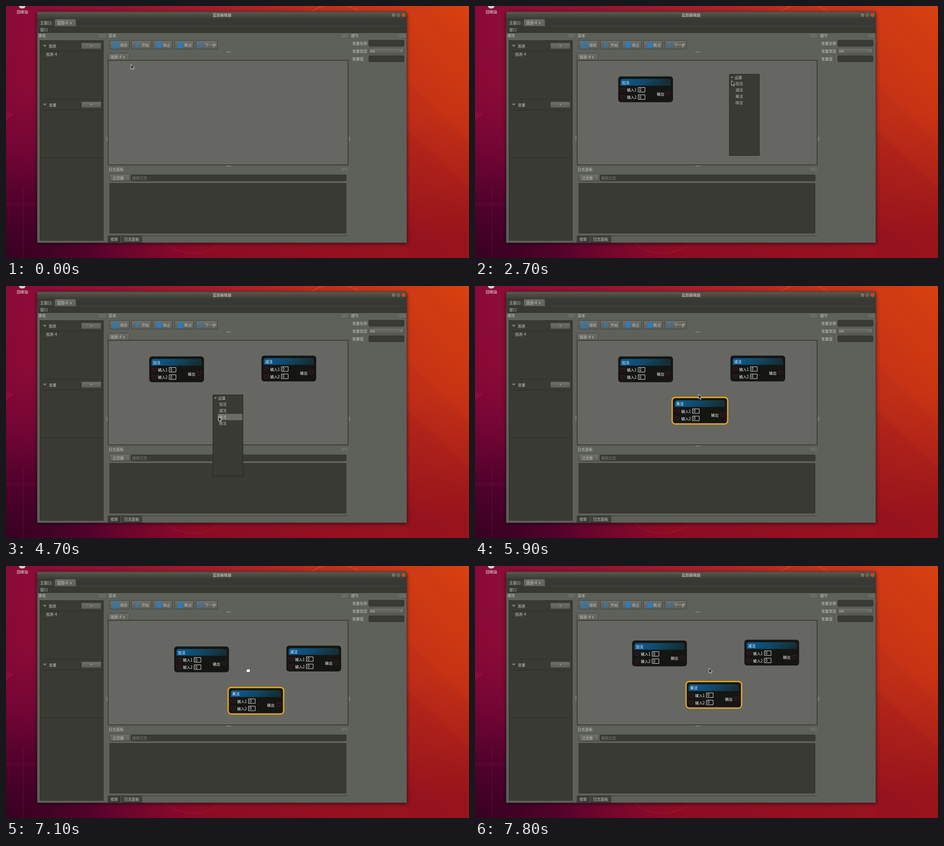
Recreate the animation shown at these times as an HTML page with a canvas. Size 1015 by 552 pixels, loop 8000 ms.

```html
<!DOCTYPE html>
<html lang="zh-CN">
<head>
<meta charset="utf-8">
<style>
html, body { margin: 0; width: 100%; height: 100%; overflow: hidden; background: #800038; }
canvas { display: block; }
</style>
</head>
<body>
<canvas id="stage" width="1015" height="552"></canvas>
<script>
const W = 1015, H = 552, LOOP = 8000, STEP = 100;
const FONT = '8.25px "Noto Sans CJK SC", "Noto Sans CJK", "Noto Sans", sans-serif';
const DARK = '#393a34', EDGE = '#2d2e29', INK = '#c5c6c1', BLUE = '#247fc8';
const screen = document.getElementById('stage').getContext('2d');
let g = screen;

function gradient(x0, y0, x1, y1, ...colors) {
  const fill = g.createLinearGradient(x0, y0, x1, y1);
  colors.forEach((c, i) => fill.addColorStop(i / (colors.length - 1), c));
  return fill;
}

function box(x, y, w, h, fill, stroke, r = 0, line = 1) {
  g.beginPath();
  g.roundRect(x, y, w, h, r);
  if (fill) { g.fillStyle = fill; g.fill(); }
  if (stroke) { g.strokeStyle = stroke; g.lineWidth = line; g.stroke(); }
}

// y is the vertical middle of the line
function text(s, x, y, color = INK, align = 'left') {
  g.font = FONT;
  g.textAlign = align;
  g.fillStyle = color;
  g.fillText(s, x, y + 3.1);
}

function path(d, x, y, fill, stroke, line = 1) {
  const p = new Path2D(d);
  g.save();
  g.translate(x, y);
  if (fill) { g.fillStyle = fill; g.fill(p); }
  if (stroke) { g.strokeStyle = stroke; g.lineWidth = line; g.stroke(p); }
  g.restore();
}

function ring(x, y, r, color, line) {
  g.beginPath();
  g.arc(x, y, r, 0, 7);
  g.strokeStyle = color;
  g.lineWidth = line;
  g.stroke();
}

function wallpaper() {
  box(0, 0, W, H, gradient(0, 0, W, 0, '#890a39', '#951431', '#aa2128', '#c6351a', '#de440d'));
  box(0, 0, W, H, gradient(500, 0, 560, H, 'rgba(130,0,40,0)', 'rgba(130,0,36,.25)', 'rgba(130,4,34,.72)'));
  const shade = g.createRadialGradient(20, 590, 0, 20, 590, 420);
  shade.addColorStop(0, 'rgba(42,0,30,.95)');
  shade.addColorStop(.4, 'rgba(60,0,44,.7)');
  shade.addColorStop(1, 'rgba(110,0,64,0)');
  box(0, 0, W, H, shade);
  path('M0 0 L17 10 L0 22Z', 0, 228, 'rgba(190,30,90,.22)');
  path('M0 432 H68 M0 436 H68 M38 552 V400', 0, 0, null, 'rgba(190,20,90,.16)', 2);
  ring(722, 88, 92, 'rgba(255,120,40,.2)', 3);
  ring(410, 450, 92, 'rgba(200,40,80,.2)', 2);
  ring(410, 450, 110, 'rgba(200,40,80,.12)', 1);
  path('M879 0 L1015 136 V300 L879 164Z', 0, 0, 'rgba(255,80,10,.06)');
  path('M879 270 L1015 400 V552 H879Z', 0, 0, 'rgba(110,0,30,.08)');
  path('M0 0 H15 L13 4 Q7 7 2 4Z', 28, 0, '#d9d5d2', '#8f8886', .6);
  text('回收站', 36, 13, '#fff', 'center');
}

function dockIcons(x, y) {
  g.save();
  g.setLineDash([1.5, 1]);
  box(x + .5, y - 2.5, 4.5, 5, null, '#92938d', 0, .9);
  box(x + 7.5, y - 2.5, 4.5, 5, null, '#92938d', 0, .9);
  g.restore();
}

function button(x, y, w, h) {
  box(x + .5, y + .5, w - 1, h - 1, gradient(0, y, 0, y + h, '#70716b', '#5b5c56'), '#41423c', 1.5);
}

function field(x, y, w, h) {
  box(x + .5, y + .5, w - 1, h - 1, DARK, '#2b2c27', 1.5);
}

function frameWindow() {
  g.save();
  g.shadowColor = 'rgba(0,0,0,.55)';
  g.shadowBlur = 8;
  g.shadowOffsetY = 2;
  box(68, 12, 811, 507, '#5e605a', null, [4, 4, 0, 0]);
  g.restore();
  box(68, 12, 811, 16.5, gradient(0, 12, 0, 28, '#5b5a50', '#3d3c35'), null, [4, 4, 0, 0]);
  text('蓝图编辑器', 473.5, 20, '#e4e0d5', 'center');
  [849.5, 860.2, 871.4].forEach((x, i) => {
    g.beginPath();
    g.arc(x, 19.7, 4.4, 0, 7);
    g.fillStyle = i < 2 ? '#7f7d73' : '#e4572f';
    g.fill();
    g.strokeStyle = '#34332d';
    g.lineWidth = .8;
    g.stroke();
  });
  path('M847.5 20H851.5 M858.5 18H862V21.5H858.5Z M869.7 18 L873.1 21.4 M873.1 18 L869.7 21.4', 0, 0, null, '#3a3933', .9);

  box(69, 28, 809, 16, '#383934');
  box(69.5, 30.5, 37, 14, '#3e3f39', '#30312c');
  box(107, 29, 46, 16, gradient(0, 29, 0, 45, '#6b6c66', '#5e605a'), null, [2, 2, 0, 0]);
  text('主窗口', 75, 37);
  text('蓝图-4', 112, 36.7);
  text('x', 140, 36.7);
  box(70, 45, 808, 13.5, '#373832', '#2f302b');
  text('窗口', 75, 52);
  box(68.5, 12.5, 810, 506, null, 'rgba(45,45,40,.6)', [4, 4, 0, 0]);
}

function leftPanel() {
  text('属性', 71, 65);
  dockIcons(205, 65);
  box(74.5, 75.5, 139, 438, DARK, '#2f302b');
  for (const y of [99, 204, 228, 332.5]) box(75, y - .5, 138, 1, EDGE);
  [['图表', 87.5], ['变量', 216.3]].forEach(([name, y]) => {
    path('M0 0 H9 L4.5 4.5Z', 80.5, y - 2.5, '#7c7d77');
    text(name, 94, y + .2);
    button(165, y - 7, 44, 14);
    text('+', 187, y, INK, 'center');
  });
  text('图表-4', 88, 106.3);
}

function toolbar() {
  text('菜单', 225, 65);
  dockIcons(736, 65);
  [['保存', 227, 44, 250], ['开始', 274.5, 44, 297], ['停止', 322, 43, 344], ['断点', 369, 43, 391], ['下一步', 416, 48, 436]]
    .forEach(([name, x, w, tx]) => { button(x, 75, w, 20); text(name, tx, 85.5); });
  path('M1 1H12L15 4V15H1Z M4 1V6H11V1 M3.5 15V9.5H12.5V15 M5 12H11', 232.5, 77, null, BLUE, 1.4);
  path('M0 0 L8.5 6 L0 12Z', 284, 79, BLUE);
  box(330, 79.5, 11, 11, BLUE);
  path('M4 4 Q8 -1 12 4 V12 Q8 17 4 12Z', 374.5, 78, BLUE);
  path('M4 5 L0 3 M4 8H-.5 M4 11 L0 14 M12 5 L16 3 M12 8H16.5 M12 11 L16 14 M5 1 L7 3 M11 1 L9 3', 374.5, 78, null, BLUE, 1.5);
  path('M8 4 V13', 374.5, 78, null, '#666761', 1);
  path('M1 13 Q1 3 9 3 M6 0 L10 3 L6 6 M16 2 Q16 11 7 11 M10 8 L6 11 L10 14 M0 13H4', 418.5, 78, null, BLUE, 1.2);
  box(483, 100, 10, 1, '#a2a39d');
  box(483, 350, 10, 1, '#a2a39d');
  box(221, 286, 1, 9, '#a2a39d');
  box(752.5, 286, 1, 9, '#a2a39d');
  box(223.5, 103.5, 47, 15, gradient(0, 103, 0, 118, '#6d6e68', '#60625c'), '#41423c', [2, 2, 0, 0]);
  text('图表-4', 229.5, 111.5);
  text('x', 256.5, 111.5);
  box(224, 119, 526, 229, '#666762', '#3d3e38', 0, 2);
}

function logPanel() {
  text('日志面板', 225, 358);
  dockIcons(736, 357.5);
  button(227, 367.5, 45, 17);
  text('过滤器', 233.5, 377);
  path('M0 0H4L2 2Z', 265, 375.5, '#989993');
  field(274, 369.5, 472, 14);
  text('搜索日志', 276.5, 377, '#83847e');
  box(227.5, 388.5, 518, 109, DARK, '#30312c');
  box(223, 502.8, 527, 1, '#393a34');
  box(223, 503, 28.5, 15, '#393a34');
  box(253.5, 503.5, 44.5, 14.5, '#41423c', '#30312c');
  text('搜索', 229, 511);
  text('日志面板', 259, 511);
}

function details() {
  text('细节', 756.5, 65);
  dockIcons(863, 65);
  ['变量名称', '变量类型', '变量值'].forEach((s, i) => text(s, 759, 82.2 + i * 17));
  field(795, 74.5, 78, 14);
  button(795, 91.5, 78, 14);
  text('int', 798, 98.7);
  path('M0 0H5L2.5 2.5Z', 864, 97.5, '#989993');
  field(795, 108.5, 78, 14);
}

const HEART = 'M0 4.5 L-4 .8 C-6.2 -1.6 -3 -6 0 -2.6 C3 -6 6.2 -1.6 4 .8Z';

function node(name, x, y, selected) {
  g.save();
  g.translate(x, y);
  box(0, 0, 120, 56.5, '#151611', null, 6);
  if (selected) box(-.7, -.6, 121.6, 58, null, '#efb118', 6.5, 2.6);
  box(5, 5.5, 110, 14.7, gradient(20, 0, 70, 50, '#0c5a94', '#104868', '#142f38'), null, [5, 5, 0, 0]);
  text(name, 8, 13.2, '#fff');
  [29.5, 45.5].forEach((row, i) => {
    path(HEART, 10.5, row, null, '#82135c', .9);
    text('输入' + (i + 1), 19, row + .4, '#fff');
    box(43.8, row - 5.2, 14.8, 10, null, '#e8e8e8');
    text('0', 46, row + .1, '#fff');
  });
  text('输出', 84.5, 38.2, '#fff');
  path(HEART, 109.5, 37.3, null, '#82135c', .9);
  g.restore();
}

const OPS = ['加法', '减法', '乘法', '除法'];

function menu(x, y, picked) {
  box(x + .5, y + .5, 66, 178, DARK, '#24251f');
  path('M0 0H6L3 3.5Z', x + 3, y + 6, '#8d8e88');
  text('运算', x + 12, y + 7.5);
  OPS.forEach((op, i) => {
    const top = y + 14 * (i + 1);
    if (i === picked) box(x + 11, top, 54, 14, '#6b6c66');
    text(op, x + 14, top + 7.3);
  });
}

function arrow(x, y) {
  path('M0 0 V10.2 L2.4 8.1 L4 11.6 L5.8 10.8 L4.2 7.4 H7.2Z', x, y, '#111', '#f4f4f4', .9);
}

function fist(x, y) {
  path('M-4 0 V-2 Q-3 -4 -1.5 -3 Q0 -4.4 1.5 -3.2 Q4 -4 4.3 -1.5 V2 L3 4 H-2.5 L-4.6 1.5Z', x, y, '#fff', '#1b1b1b', .8);
}

// [time, x, y] of the pointer tip
const POINTER = [
  [0, 274, 128], [400, 314, 152], [800, 314, 152], [1200, 328, 172], [1700, 328, 172],
  [2400, 557, 151], [2500, 557, 151], [3000, 571, 183], [3400, 571, 183], [3700, 571, 187],
  [3800, 571, 187], [3900, 464, 237], [4200, 454, 239], [4500, 466, 286], [4900, 466, 286],
  [5000, 466, 272], [5100, 466, 272], [5400, 512, 254], [5500, 512, 254], [5800, 489, 258],
  [5900, 490, 237], [6100, 500, 213], [6200, 500, 213]
];
// [time, hand x, hand y, view dx, view dy]
const PAN = [
  [6200, 500, 213, 0, 0], [6300, 520, 222, 20, 9], [6500, 470, 225, -90, 16], [6700, 674, 284, 60, 67.5],
  [6900, 470, 195, -60, -18], [7100, 531, 229, 54.7, 22], [7200, 545, 258, 62, 50],
  [7400, 400, 250, -88, 36], [7500, 420, 205, -68, -15], [7700, 518, 225, 34, 5], [7800, 513, 224, 30.5, 9]
];
// [open, close, pick time, x, y]
const MENUS = [[600, 1700, 1200, 311, 151], [2500, 3500, 2900, 557, 149], [4200, 5000, 4700, 453, 238]];

function sample(keys, t) {
  const i = keys.findIndex(k => k[0] > t);
  if (i < 0) return keys[keys.length - 1].slice(1);
  if (i === 0) return keys[0].slice(1);
  const a = keys[i - 1], b = keys[i], p = (t - a[0]) / (b[0] - a[0]);
  return a.slice(1).map((v, j) => v + (b[j + 1] - v) * p);
}

const base = document.createElement('canvas');
base.width = W;
base.height = H;

function drawBase() {
  g = base.getContext('2d');
  wallpaper();
  frameWindow();
  leftPanel();
  toolbar();
  logPanel();
  details();
  g = screen;
}

function draw(t) {
  g.drawImage(base, 0, 0);
  const [hx, hy, dx, dy] = sample(PAN, t);
  const drag = Math.min(1, Math.max(0, (t - 5500) / 300));
  g.save();
  g.beginPath();
  g.rect(225, 120, 524, 227);
  g.clip();
  g.translate(dx, dy);
  if (t >= 1700) node(OPS[0], 314, 154.2);
  if (t >= 3500) node(OPS[1], 560, 152.6);
  if (t >= 5000) node(OPS[2], 456 - 23 * drag, 241 + 3.7 * drag, t >= 5600);
  g.restore();
  MENUS.forEach(([open, close, pick, x, y], i) => {
    if (t >= open && t < close) menu(x, y, t >= pick ? i : -1);
  });
  if (t < 6300) arrow(...sample(POINTER, t));
  else if (t < 7800) fist(hx, hy);
  else arrow(hx, hy);
}

drawBase();
const start = performance.now();
function tick() {
  const t = (performance.now() - start) % LOOP;
  draw(Math.floor(t / STEP) * STEP);
  requestAnimationFrame(tick);
}
tick();
</script>
</body>
</html>
```
